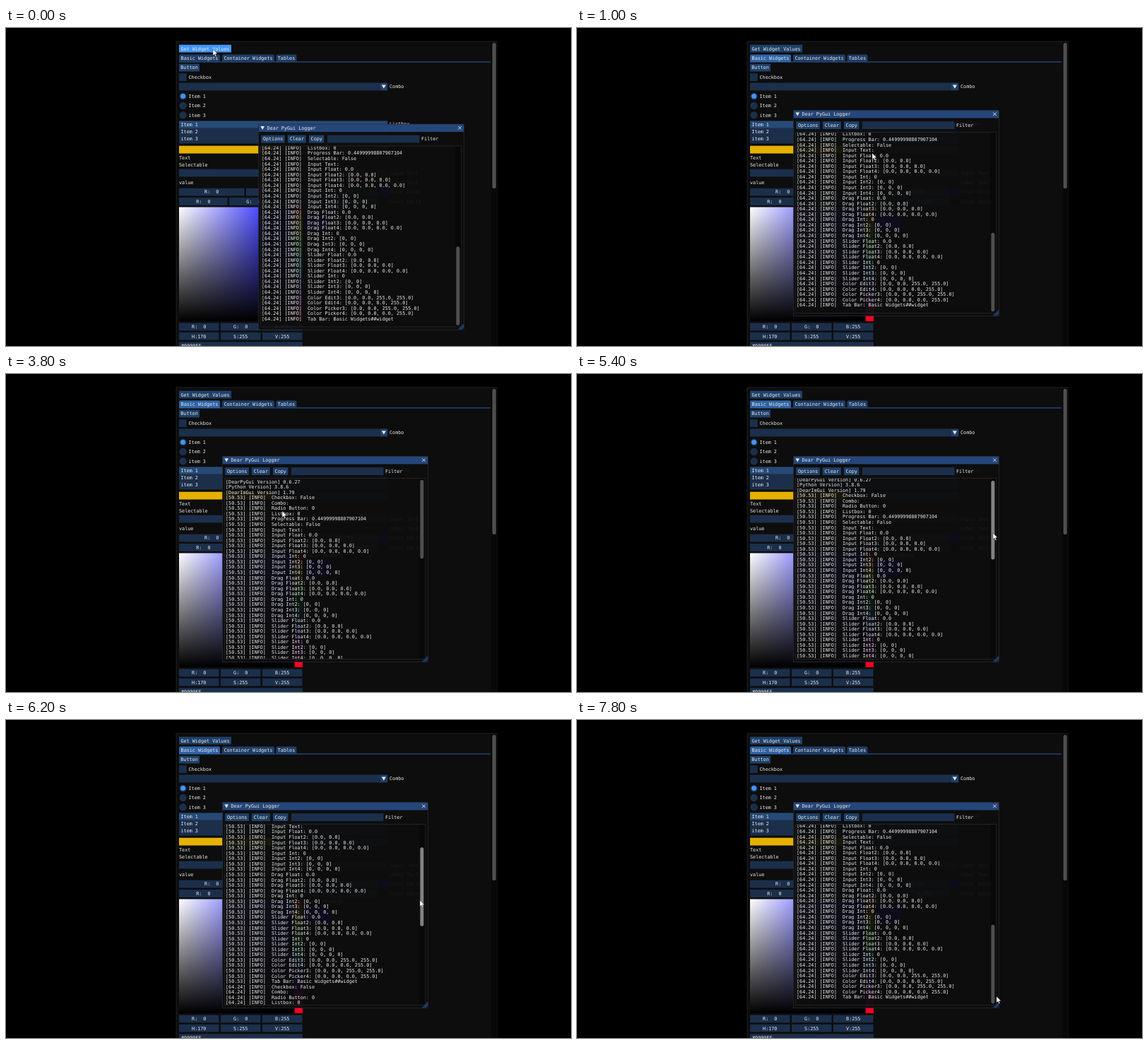
Animation, 800 px wide and 450 px high, one loop 8 s. Source, as an HTML page with a canvas:

```html
<!DOCTYPE html>
<html lang="en">
<head>
<meta charset="utf-8">
<title>Widget logger</title>
<style>
html, body { margin: 0; width: 100%; height: 100%; overflow: hidden; background: #000; }
canvas { display: block; width: 800px; height: 450px; }
</style>
</head>
<body>
<canvas id="stage" width="800" height="450"></canvas>
<script>
const ctx = document.getElementById("stage").getContext("2d");
const LOOP = 8000, STEP = 200;
const LINE = 7.56, RATIO = 2.283, THUMB_TRAVEL = 140;
const COLOR = {
  panel: "#0d0d0d", frame: "#1b2f4b", button: "#1f4068", hover: "#4296fa",
  tab: "#1e3d66", tabActive: "#2f63a5", title: "#25467a", text: "#ececec"
};

// Each track is a list of [time, ...values].
const cursorTrack = [
  [0, 293, 30], [200, 345, 75], [400, 465, 140], [600, 438, 130], [800, 414, 121],
  [1000, 418, 177], [1200, 530, 290], [1400, 588, 335], [1800, 588, 195],
  [2000, 560, 240], [2200, 482, 256], [2400, 404, 208], [2600, 391, 194],
  [4000, 391, 194], [4200, 402, 207], [4400, 445, 232], [4600, 505, 248],
  [4800, 560, 247], [5000, 582, 232], [5200, 589, 224], [5400, 589, 225],
  [6200, 586, 255], [7800, 594, 391]
];
const windowTrack = [[0, 51, 19.5], [400, 51, 19.5], [800, 0, 0]];
const thumbTrack = [
  [0, THUMB_TRAVEL], [1400, THUMB_TRAVEL], [1800, 0], [5200, 0],
  [5400, 1.3], [6200, 30.5], [7500, THUMB_TRAVEL]
];

function sample(track, t) {
  const next = track.findIndex(key => key[0] > t);
  if (next < 0) return track[track.length - 1].slice(1);
  const a = track[next - 1], b = track[next];
  const k = (t - a[0]) / (b[0] - a[0]);
  return a.slice(1).map((v, i) => v + (b[i + 1] - v) * k);
}

function logLines() {
  const series = name => ["", 2, 3, 4].map((n, i) => {
    const zero = name.endsWith("Int") ? "0" : "0.0";
    return `${name}${n}: ` + (i ? `[${Array(i + 1).fill(zero).join(", ")}]` : zero);
  });
  const entries = [
    "Checkbox: False", "Combo:", "Radio Button: 0", "Listbox: 0",
    "Progress Bar: 0.44999998807907104", "Selectable: False", "Input Text:",
    ...["Input", "Drag", "Slider"].flatMap(kind =>
      [...series(kind + " Float"), ...series(kind + " Int")]),
    "Color Edit3: [0.0, 0.0, 255.0, 255.0]", "Color Edit4: [0.0, 0.0, 0.0, 255.0]",
    "Color Picker3: [0.0, 0.0, 255.0, 255.0]", "Color Picker4: [0.0, 0.0, 0.0, 255.0]",
    "Tab Bar: Basic Widgets##widget"
  ];
  return [
    "[DearPyGui Version] 0.6.27", "[Python Version] 3.8.6", "[DearImGui Version] 1.79",
    ...["50.53", "64.24"].flatMap(time => entries.map(e => `[${time}] [INFO]  ${e}`))
  ];
}
const lines = logLines();

function box(x, y, w, h, fill, radius = 0) {
  ctx.fillStyle = fill;
  ctx.beginPath();
  ctx.roundRect(x, y, w, h, radius);
  ctx.fill();
}

function text(s, x, middle, align = "left") {
  ctx.fillStyle = COLOR.text;
  ctx.textAlign = align;
  ctx.fillText(s, x, middle + 2.3);
}

function cell(label, x, y, w, fill = COLOR.frame) {
  box(x, y, w, 10.8, fill);
  text(label, x + w / 2, y + 5.4, "center");
}

function polygon(points, fill) {
  ctx.fillStyle = fill;
  ctx.beginPath();
  points.forEach(([x, y]) => ctx.lineTo(x, y));
  ctx.closePath();
  ctx.fill();
}

function outline(x, y, w, h) {
  ctx.strokeStyle = "#2b2b31";
  ctx.lineWidth = 0.7;
  ctx.strokeRect(x, y, w, h);
}

function arrowDown(x, y, r) {
  polygon([[x - r, y - r * 0.8], [x + r, y - r * 0.8], [x, y + r]], COLOR.text);
}

function gradient(x0, y0, x1, y1, colors) {
  const g = ctx.createLinearGradient(x0, y0, x1, y1);
  colors.forEach((c, i) => g.addColorStop(i / (colors.length - 1), c));
  return g;
}

function drawPicker() {
  box(245, 253.5, 161, 161.5, gradient(245, 0, 406, 0, ["#fff", "#00f"]));
  box(245, 253.5, 161, 161.5, gradient(0, 253.5, 0, 415, ["rgba(0,0,0,0)", "#000"]));
  box(408.7, 253.5, 11.3, 161.5, gradient(0, 253.5, 0, 415,
    ["#f00", "#ff0", "#0f0", "#0ff", "#00f", "#f0f", "#f00"]));
  text("Color Picker3", 424, 257);
  box(424, 264, 35, 23, "#00f");
  ["R:  0", "G:  0", "B:255"].forEach((s, i) => cell(s, 245 + i * 59, 417.4, 56.5));
  ["H:170", "S:255", "V:255"].forEach((s, i) => cell(s, 245 + i * 59, 430.8, 56.5));
  box(245, 444.3, 175, 10.8, COLOR.frame);
  text("#0000FF", 248, 449.7);
}

function drawMain(hovered) {
  box(241, 19, 454, 440, COLOR.panel);
  outline(241, 19, 454, 440);
  box(687, 20, 8, 430, "#080808");
  box(688.6, 21, 5.2, 206, "#4f4f4f", 2.6);

  cell("Get Widget Values", 245, 23.8, 74, hovered ? COLOR.hover : COLOR.button);
  box(245, 47.6, 441, 0.9, COLOR.tabActive);
  [["Basic Widgets", 245, 58], ["Container Widgets", 306, 74], ["Tables", 382.5, 29]]
    .forEach(([label, x, w], i) => {
      box(x, 37.5, w, 10.7, !i && !hovered ? COLOR.tabActive : COLOR.tab, [2, 2, 0, 0]);
      text(label, x + w / 2, 42.8, "center");
    });
  cell("Button", 245, 50.7, 29, COLOR.button);

  box(245, 64.2, 10.8, 10.8, COLOR.frame);
  text("Checkbox", 258.5, 69.6);
  box(245, 77.6, 284.5, 10.8, COLOR.frame);
  box(529.5, 77.6, 10.8, 10.8, COLOR.button);
  arrowDown(534.9, 82.8, 3);
  text("Combo", 543, 83);

  ["Item 1", "Item 2", "item 3"].forEach((label, i) => {
    const y = 96.6 + i * 13.4;
    box(245.4, y - 5.2, 10.4, 10.4, COLOR.frame, 5.2);
    if (!i) box(247.1, y - 3.5, 7, 7, COLOR.hover, 3.5);
    text(label, 258.5, y);
  });

  box(245, 131, 295, 32.5, COLOR.frame);
  box(245, 132, 295, 9.4, "#264a77");
  ["Item 1", "Item 2", "item 3"].forEach((s, i) => text(s, 247.5, 136.6 + i * 9.9));
  text("Listbox", 543, 136);

  box(245, 166.7, 295, 10.8, COLOR.frame);
  box(245, 166.7, 133, 10.8, "#e6b000");
  text("Text", 245, 184);
  text("Selectable", 245, 193.8);
  box(245, 199.8, 295, 10.8, COLOR.frame);
  text("Input Text", 543, 205.2);
  text("value", 245, 218.6);
  text("Label Text", 543, 218.6);

  ["R:  0", "G:  0", "B:255"].forEach((s, i) => cell(s, 245 + i * 95, 226.7, 92.5));
  box(529.5, 226.7, 10.8, 10.8, "#00f");
  text("Color Edit3", 543, 232);
  ["R:  0", "G:  0", "B:  0", "A:255"].forEach((s, i) => cell(s, 245 + i * 71.2, 240.1, 68.6));
  box(529.5, 240.1, 10.8, 10.8, "#000");
  text("Color Edit4", 543, 245.5);
  drawPicker();
}

function drawLogger(dx, dy, thumb, grabbed) {
  ctx.save();
  ctx.translate(dx, dy);
  box(306.5, 116.5, 291, 291, "rgba(13,13,13,.94)", 3);
  box(306.5, 116.5, 291, 11, COLOR.title, [3, 3, 0, 0]);
  outline(306.5, 116.5, 291, 291);
  arrowDown(312.2, 121.7, 2.8);
  text("Dear PyGui Logger", 318.5, 122);
  ctx.strokeStyle = COLOR.text;
  ctx.lineWidth = 0.9;
  ctx.beginPath();
  ctx.moveTo(589.3, 119.6); ctx.lineTo(593.7, 124);
  ctx.moveTo(593.7, 119.6); ctx.lineTo(589.3, 124);
  ctx.stroke();

  cell("Options", 310.3, 132.2, 33.6, COLOR.button);
  cell("Clear", 347.8, 132.2, 26, COLOR.button);
  cell("Copy", 378, 132.2, 21.4, COLOR.button);
  box(404, 132.2, 130.5, 10.8, COLOR.frame);
  text("Filter", 537, 137.6);

  outline(309.8, 147.4, 284, 256);
  box(585.7, 148, 7.5, 255, "rgba(5,5,5,.53)");
  box(586.4, 149.8 + thumb, 5, 111.5, grabbed ? "#828282" : "#4f4f4f", 2.5);
  polygon([[597.3, 398.5], [597.3, 404.5], [594.5, 407.3], [588.5, 407.3]], "#1c3a61");

  ctx.beginPath();
  ctx.rect(310, 148, 275, 255);
  ctx.clip();
  lines.forEach((line, i) => {
    const y = 152.2 + i * LINE - thumb * RATIO;
    if (y > 140 && y < 410) text(line, 311, y);
  });
  ctx.restore();
}

function drawCursor(x, y) {
  const shape = [[0, 0], [0, 9], [2.1, 7.2], [3.6, 10.6], [5, 10], [3.6, 6.7], [6.4, 6.5]];
  polygon(shape.map(([px, py]) => [x + px, y + py]), "#fff");
  ctx.strokeStyle = "#000";
  ctx.lineWidth = 0.4;
  ctx.stroke();
}

function render(now) {
  const t = Math.floor((now % LOOP) / STEP) * STEP;
  const [thumb] = sample(thumbTrack, t);
  const grabbed = (t >= 1400 && t <= 1800) || (t >= 5200 && t < 7800);
  ctx.font = '6.76px "DejaVu Sans Mono", monospace';
  ctx.fillStyle = "#000";
  ctx.fillRect(0, 0, 800, 450);
  drawMain(t < STEP);
  drawLogger(...sample(windowTrack, t), thumb, grabbed);
  drawCursor(...sample(cursorTrack, t));
}

const start = performance.now();
function tick() {
  render(performance.now() - start);
  requestAnimationFrame(tick);
}
tick();
</script>
</body>
</html>
```
